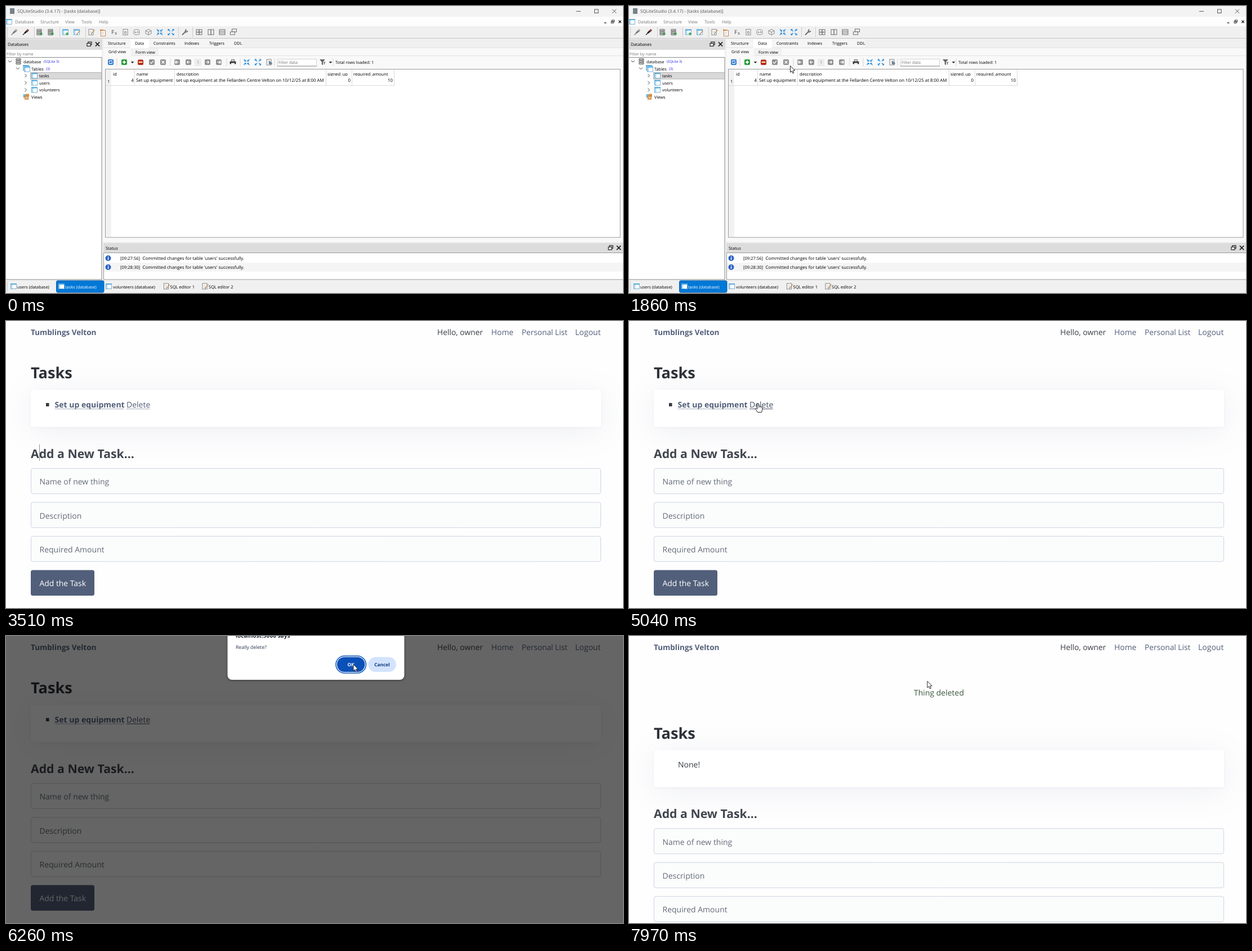
An HTML page with a canvas that plays this animation: 1096x511 px, repeating every 8000 ms.

```html
<!DOCTYPE html>
<html lang="en">
<head>
<meta charset="utf-8">
<title>Task list</title>
<style>
html, body { margin: 0; width: 100%; height: 100%; overflow: hidden; background: #fefefe; }
canvas { display: block; width: 1096px; height: 511px; }
</style>
</head>
<body>
<canvas id="stage" width="1096" height="511"></canvas>
<script>
const W = 1096, H = 511, LOOP = 8000;
const ctx = document.getElementById('stage').getContext('2d');
const FONT = '"Open Sans", "Noto Sans", sans-serif';

// ---------- helpers ----------
const clamp = v => Math.max(0, Math.min(1, v));
const span = (t, a, b) => clamp((t - a) / (b - a));
const easeOut = v => 1 - (1 - v) ** 3;
const easeInOut = v => v * v * (3 - 2 * v);

function rect(x, y, w, h, c) {
  ctx.fillStyle = c;
  ctx.fillRect(x, y, w, h);
}
function frame(x, y, w, h, c, lw = 1) {
  ctx.strokeStyle = c;
  ctx.lineWidth = lw;
  ctx.strokeRect(x, y, w, h);
}
function round(x, y, w, h, r, fill, stroke, lw = 1) {
  ctx.beginPath();
  ctx.roundRect(x, y, w, h, r);
  if (fill) { ctx.fillStyle = fill; ctx.fill(); }
  if (stroke) { ctx.strokeStyle = stroke; ctx.lineWidth = lw; ctx.stroke(); }
}
function trace(x, y, pts) {
  ctx.beginPath();
  for (let i = 0; i < pts.length; i += 2) ctx.lineTo(x + pts[i], y + pts[i + 1]);
}
function line(x, y, pts, c, lw = 1) {
  trace(x, y, pts);
  ctx.strokeStyle = c;
  ctx.lineWidth = lw;
  ctx.stroke();
}
function poly(x, y, pts, c) {
  trace(x, y, pts);
  ctx.fillStyle = c;
  ctx.fill();
}
function disc(x, y, r, c) {
  ctx.beginPath();
  ctx.arc(x, y, r, 0, 7);
  ctx.fillStyle = c;
  ctx.fill();
}
// y is the middle of the capital letters
function text(s, x, y, size = 7.5, c = '#000', weight = 400, align = 'left') {
  ctx.font = `${weight} ${size}px ${FONT}`;
  ctx.textAlign = align;
  ctx.fillStyle = c;
  ctx.fillText(s, x, y + size * 0.36);
}

// ---------- icons, all placed by their centre ----------
const BLUE = '#2b8fe0', GREY = '#6b6b6b', OFF = '#8f8f8f';

function cross(x, y, r, c, lw) {
  line(x, y, [-r, -r, r, r], c, lw);
  line(x, y, [-r, r, r, -r], c, lw);
}
function plus(x, y, r, c, lw) {
  line(x, y, [-r, 0, r, 0], c, lw);
  line(x, y, [0, -r, 0, r], c, lw);
}
function table(x, y) {
  rect(x - 5, y - 5, 11, 10, '#fff');
  rect(x - 5, y - 5, 3.5, 10, '#b5e0f6');
  rect(x - 5, y - 5, 11, 2.2, '#55b0e8');
  frame(x - 4.5, y - 4.5, 10, 9, '#6fa9cf', 0.9);
}
function stack(x, y) {
  for (const d of [-3.6, 0, 3.6]) {
    round(x - 4.5, y + d - 1.6, 9, 3.4, 1.4, '#9b9b9b', '#666', 0.6);
    rect(x - 3, y + d - 0.5, 5, 0.8, '#ddd');
  }
}
function page(x, y, c = '#777') {
  rect(x - 4, y - 5, 8, 10, '#fff');
  frame(x - 4, y - 5, 8, 10, c, 0.9);
  for (const d of [-2, 0, 2]) line(x, y + d, [-2.4, 0, 1.6, 0], '#bbb', 0.7);
}
function pencil(x, y) {
  line(x, y, [4, -4, -1, 2], '#c99a5c', 1.5);
  line(x, y, [-1, 2, -2, 3.4], '#444', 1.2);
}
function plug(x, y, c) {
  line(x, y, [-5, 5, -2, 2], c, 1.2);
  poly(x, y, [-3, 1, 1, -3, 3, -1, -1, 3], c);
  line(x, y, [1, -2, 4, -5], c, 1.1);
  line(x, y, [2, 0, 5.4, -3.4], c, 1.1);
}
function arrows(x, y, inward) {
  for (const [a, b] of [[-1, -1], [1, -1], [-1, 1], [1, 1]]) {
    line(x, y, [a * 1.5, b * 1.5, a * 5, b * 5], BLUE, 1.5);
    const k = inward ? 1 : 5.6, m = inward ? 4.6 : 2;
    poly(x, y, [a * k, b * k, a * m, b * k, a * k, b * m], BLUE);
  }
}
function key(x, y, c) { round(x - 5, y - 5, 10, 10, 2, c); }
function navKey(x, y, dir, bar) {
  key(x, y, OFF);
  line(x, y, [-3 * dir, 0, 2 * dir, 0], '#fff', 1.2);
  line(x, y, [0, -2.6, 2.6 * dir, 0, 0, 2.6], '#fff', 1.2);
  if (bar) line(x, y, [3.3 * dir, -3, 3.3 * dir, 3], '#fff', 1);
}
function handle(x, y, h) {
  for (let d = 0; d < h; d += 2) rect(x, y + d, 1, 1, '#aaa');
}
function chevron(x, y, open) {
  line(x, y, open ? [-3, -1.5, 0, 1.5, 3, -1.5] : [-1.5, -3, 1.5, 0, -1.5, 3], '#444', 1);
}
function dockButtons(x, y) {
  frame(x - 2, y - 4, 6, 5, '#222', 1.2);
  rect(x - 4, y - 1.5, 6, 5, '#eee');
  frame(x - 4, y - 1.5, 6, 5, '#222', 1.2);
  cross(x + 14.5, y, 3.6, '#222', 1.7);
}
function panes(x, y, draw) {
  frame(x - 5, y - 4.5, 10, 9, GREY);
  draw();
}

// ---------- database window ----------
function titleAndMenu() {
  rect(0, 0, W, 19, '#f3f3f3');
  rect(0, 19, W, 17, '#fdfdfd');
  rect(7, 4, 8, 10, '#77828a');
  text('SQLiteStudio (3.4.17) - [tasks (database)]', 20, 9.5, 7.9, '#555');
  line(1017, 9.5, [-4, 0, 4, 0], '#555');
  frame(1045.5, 6, 6.5, 6.5, '#555');
  cross(1080.5, 9.3, 3.5, '#555', 1);
  table(5, 28);
  [['Database', 16], ['Structure', 61], ['View', 105], ['Tools', 134], ['Help', 165]]
    .forEach(([s, x]) => text(s, x, 28, 7.7, '#777'));
  line(1064.5, 30, [-2, 0, 2, 0], '#222', 1.3);
  frame(1076.5, 25, 4, 3.5, '#333', 0.9);
  frame(1075, 27, 4, 3.5, '#333', 0.9);
  cross(1090.5, 28, 2.2, '#222', 1.3);
}

function mainToolbar() {
  const y = 46.5;
  rect(0, 36, W, 22, '#f0f0f0');
  [2, 50, 95, 141, 306, 331].forEach(x => handle(x, 38, 18));
  plug(14.5, y, '#777');
  plug(35, y, '#222');
  disc(39, 43, 1.5, '#c33');
  stack(59, y); plus(62.5, 49.5, 2.6, '#2fa043', 1.7);
  stack(79, y); plus(82.5, 49.5, 2.6, '#2fa043', 1.7);
  table(105, y); plus(108.5, 49.5, 2.6, '#2fa043', 1.7);
  table(125, y); pencil(127.5, 47.5);
  page(151, y); pencil(153.5, 46.5);
  poly(171.5, y, [-5, -5, 3, -4, 5, 0, -3, -1], '#e08a3c');
  page(172.5, y + 2, '#b9793d');
  text('F', 187, 46, 10, '#444');
  text('x', 193, 48.5, 8, '#444');
  page(212, y); text('{}', 212, y, 6, '#333', 400, 'center');
  round(227, 42, 10, 9, 3, '#fafafa', '#888'); text('a,b', 232, y, 5, '#333', 400, 'center');
  line(253, y, [0, -5, 5, -2.5, 5, 2.5, 0, 5, -5, 2.5, -5, -2.5, 0, -5], '#888');
  line(253, y, [-5, -2.5, 0, 0, 5, -2.5], '#888');
  line(253, y, [0, 0, 0, 5], '#888');
  arrows(273, y, true);
  arrows(293, y, false);
  line(318, y, [-5, 5, 1, -1], GREY, 2);
  line(318, y, [2, -5, 0.5, -2, 2, 0, 5, -2], GREY, 1.8);
  panes(343, y, () => plus(343, y, 4.5, GREY, 1.4));
  panes(364, y, () => line(364, y, [0, -4.5, 0, 4.5], GREY, 1.4));
  panes(384, y, () => { rect(379, 44.5, 10, 1, GREY); rect(379, 47.5, 10, 1, GREY); });
  frame(401.5, 41, 8, 5, GREY);
  rect(398.5, 46, 8, 5, '#f0f0f0');
  frame(398.5, 46, 8, 5, GREY);
  rect(0, 57, W, 1, '#c4c4c4');
}

function databaseTree() {
  rect(0, 59, 171, 19, '#dcdcdc');
  text('Databases', 3, 68.5, 7.6);
  dockButtons(148, 68);
  rect(0, 78, 170, 13, '#fff');
  text('Filter by name', 1, 85.5, 7.2, '#777');
  rect(0, 91, 170.5, 396, '#fff');
  frame(-0.5, 91.5, 170.5, 395.5, '#8a8a8a');
  chevron(7, 98.5, true);
  stack(22, 98.5);
  text('database', 31, 99, 7.3);
  text('(SQLite 3)', 67, 98.5, 6.2, '#2020e0');
  chevron(21, 111, true);
  table(35, 110); table(37, 112.5);
  text('Tables', 45, 112, 7.4);
  text('(3)', 71, 111.5, 6.2, '#2020e0');
  rect(43, 118, 126.5, 12, '#d9d9d9');
  frame(43.5, 118.5, 126, 11.5, '#b0b0b0');
  ['tasks', 'users', 'volunteers'].forEach((s, i) => {
    const y = 124 + i * 12.7;
    chevron(35, y, false);
    table(50, y);
    text(s, 59, y + 0.3, 7.4);
  });
  rect(30.5, 157, 6, 6, '#6fb9e6');
  rect(35, 156.5, 6, 5, '#e0913a');
  rect(33, 160, 7, 6.5, '#f0b873');
  frame(33.5, 160.5, 6, 5.5, '#b9783a', 0.9);
  text('Views', 45, 162.3, 7.4);
}

function gridToolbar() {
  const y = 100;
  key(186, y, '#2f78d0');
  line(186, y, [-3, 0, -2, -2.4, 2, -2.4, 2.6, -1], '#fff', 1.2);
  line(186, y, [3, 0, 2, 2.4, -2, 2.4, -2.6, 1], '#fff', 1.2);
  key(210, y, '#279a3a'); plus(210, y, 3, '#fff', 1.8);
  poly(224.5, y, [-2.8, -1, 2.8, -1, 0, 2], '#222');
  round(234, 95.5, 10, 9.5, 2, '#b52a1c'); rect(235.5, 98.8, 7, 2.3, '#ffe3a8');
  key(259, y, OFF); line(259, y, [-2.8, 0, -0.8, 2.3, 3, -2.6], '#fff', 1.3);
  key(279, y, OFF); cross(279, y, 2.4, '#fff', 1.4);
  navKey(304, y, -1, true);
  navKey(324, y, -1);
  rect(335, 94, 12, 13, '#ececec');
  text('1', 341, 100.5, 7.4, '#888', 400, 'center');
  navKey(358, y, 1);
  navKey(378, y, 1, true);
  rect(400, 95, 6, 4, '#ddd'); frame(400.5, 95.5, 5, 4, '#555', 0.8);
  round(397.5, 98.5, 11, 5, 1, '#3c3c3c');
  rect(400, 101.5, 6, 3.5, '#f4f4f4');
  arrows(427.5, y, true);
  arrows(447.5, y, false);
  page(467, y); poly(468, y, [-1, -3, 4.5, 1, 4.5, 4, -1, 4], '#6f8592');
  [196.5, 291.5, 391.5, 415.5, 476.5, 580.5].forEach(x => rect(x, 93, 1, 14, '#d6d6d6'));
  rect(482, 94, 70, 13, '#fff');
  frame(482.5, 94.5, 69, 12.5, '#d4d4d4');
  rect(482, 106.5, 70, 1, '#999');
  text('Filter data', 484, 100.5, 7.3, '#777');
  poly(562, y, [-5, -5, 5, -5, 1.2, -0.5, 1.2, 5, -1.2, 4, -1.2, -0.5], '#666');
  text('T', 564, 102, 6, '#333', 700);
  poly(576.5, y, [-2.8, -1, 2.8, -1, 0, 2], '#222');
  text('Total rows loaded: 1', 585, 100.5, 7.35);
}

function dataPane() {
  rect(171, 58, W - 171, 16, '#f0f0f0');
  rect(173, 74, W - 173, 346, '#f9f9f9');
  rect(174, 59, 246, 15, '#f5f5f5');
  rect(221, 59, 33, 16, '#fff');
  [['Structure', 181], ['Data', 229], ['Constraints', 262], ['Indexes', 317], ['Triggers', 361], ['DDL', 405]]
    .forEach(([s, x]) => text(s, x, 66.5, 7.3));
  rect(173, 74, 48, 1, '#e2e2e2');
  rect(254, 74, W - 254, 1, '#e2e2e2');
  rect(222, 75, 49, 13, '#f1f1f1');
  rect(222, 88, W - 222, 1, '#e4e4e4');
  text('Grid view', 182, 81.5, 7.2);
  text('Form view', 230, 82, 7.3);
  gridToolbar();

  rect(176, 112, 915, 300, '#fff');
  frame(176.5, 112.5, 914.5, 299.5, '#9a9a9a');
  rect(177, 113, 10, 298, '#f2f2f2');
  [['id', 190], ['name', 232], ['description', 303], ['signed_up', 571], ['required_amount', 617]]
    .forEach(([s, x]) => text(s, x, 121, 7.6));
  // the low header row cuts off the underscores
  rect(187, 124.5, 503, 16.5, '#fff');
  [228, 299, 568, 614, 689].forEach(x => rect(x, 113, 1, 29, '#dadada'));
  rect(177, 141, 512, 1, '#dadada');
  text('1', 182, 134.5, 7.4, '#000', 400, 'center');
  text('4', 227, 132.5, 7.9, '#000', 400, 'right');
  text('Set up equipment', 231, 132.5, 7.9);
  text('set up equipment at the Fellarden Centre Velton on 10/12/25 at 8:00 AM', 302, 132.5, 7.85);
  text('0', 612, 132.5, 7.9, '#000', 400, 'right');
  text('10', 687, 132.5, 7.9, '#000', 400, 'right');
}

function statusPane() {
  rect(173, 422, W - 173, 18, '#dcdcdc');
  text('Status', 177, 431, 7.5);
  dockButtons(1074, 430.5);
  rect(173, 440, W - 173, 47, '#fff');
  rect(173, 457, W - 173, 16, '#f5f5f5');
  line(173.5, 439.5, [W, 0, 0, 0, 0, 47.5, W, 47.5], '#9a9a9a');
  ['[09:27:56]', '[09:28:30]'].forEach((s, i) => {
    const y = 449 + i * 16;
    disc(181.5, y, 5, '#2c62c4');
    rect(180.8, y - 1, 1.6, 4, '#fff');
    rect(180.8, y - 3.3, 1.6, 1.5, '#fff');
    text(s, 203, y + 0.5, 7.6);
    text("Committed changes for table 'users' successfully.", 242.5, y + 0.5, 7.95);
  });
}

function windowTabs() {
  rect(0, 488, W, 23, '#f0f0f0');
  handle(2, 491, 18);
  round(89.5, 489, 84.5, 21, 2.5, '#0078d7', '#0a5ea8');
  table(13, 499); text('users (database)', 20, 500, 7.4);
  table(98, 499); text('tasks (database)', 105, 500, 7.4, '#fff');
  table(182, 499); text('volunteers (database)', 190, 500, 7.45);
  page(284.5, 499); pencil(287, 499.5); text('SQL editor 1', 291.5, 500, 7.6);
  page(353, 499); pencil(355.5, 499.5); text('SQL editor 2', 360, 500, 7.6);
}

function drawDatabase() {
  rect(0, 0, W, H, '#f0f0f0');
  titleAndMenu();
  mainToolbar();
  dataPane();
  databaseTree();
  statusPane();
  windowTabs();
}

// ---------- web page ----------
const LINK = '#525f7a', BODY = '#373c44';

function drawPage(deleted, hover, caret) {
  const dy = deleted ? 80.4 : 0;
  rect(0, 0, W, H, '#fefefe');
  text('Tumblings Velton', 44, 20, 13.5, LINK, 700);
  text('Hello, owner', 766, 20, 13.85, BODY);
  text('Home', 862, 20, 13.9, LINK);
  text('Personal List', 916, 20, 13.7, LINK);
  text('Logout', 1011, 20, 14, LINK);
  if (deleted) text('Thing deleted', 550.5, 101, 14, '#3d5a40', 400, 'center');

  ctx.save();
  ctx.translate(0, dy);
  text('Tasks', 44, 92.5, 27.2, '#2d3138', 700);
  ctx.save();
  ctx.shadowColor = 'rgba(110,120,165,0.11)';
  ctx.shadowBlur = 56;
  ctx.shadowOffsetY = 8;
  round(44, 122.5, 1013, 66, 3.5, '#fff');
  ctx.shadowColor = 'rgba(110,120,165,0.07)';
  ctx.shadowBlur = 5;
  ctx.shadowOffsetY = 1;
  round(44, 122.5, 1013, 66, 3.5, '#fff');
  ctx.restore();
  if (deleted) {
    text('None!', 87, 149, 14, BODY);
  } else {
    rect(71, 146, 5.5, 6, BODY);
    text('Set up equipment', 86.5, 149, 14, LINK, 700);
    rect(86.5, 156, 123.5, 1, '#a4acbd');
    text('Delete', 214, 149, 14, hover ? '#454f66' : LINK);
    rect(214, 156, 41.5, 1, hover ? '#454f66' : '#a4acbd');
  }
  text('Add a New Task...', 44, 236, 21.25, '#40454e', 700);
  if (caret) rect(59, 219.5, 1, 29.5, '#8c8f98');
  ['Name of new thing', 'Description', 'Required Amount'].forEach((s, i) => {
    const y = 262.5 + i * 60.4;
    round(44.5, y, 1012, 45, 3.5, '#fbfdfc', '#cfd3e4');
    text(s, 59.5, y + 23.7, 14, '#646b79');
  });
  round(44, 443.5, 113, 45.5, 3.5, LINK);
  text('Add the Task', 59.5, 467, 13.9, '#fff');
  ctx.restore();
}

function drawDialog(dy, alpha, focus) {
  if (alpha <= 0) return;
  ctx.save();
  ctx.globalAlpha = alpha;
  ctx.translate(0, dy);
  ctx.save();
  ctx.shadowColor = 'rgba(0,0,0,0.45)';
  ctx.shadowBlur = 4;
  ctx.shadowOffsetY = 1;
  round(393.5, -60, 314, 138, 8, '#fff');
  ctx.restore();
  text('localhost:5000 says', 408, -1, 10.1, '#1f2937', 700);
  text('Really delete?', 408, 19.5, 8.7, '#26344d');
  round(588, 37.5, 49.5, 26.5, 13.2, '#0b50b8');
  if (focus) round(586, 35.5, 53.5, 30.5, 15.2, null, '#0b50b8', 1.5);
  text('OK', 612.7, 50.8, 8.4, '#fff', 700, 'center');
  round(643.5, 37.5, 49.5, 26.5, 13.2, '#d3e3fd');
  text('Cancel', 668, 50.8, 8.3, '#0d3a80', 700, 'center');
  ctx.restore();
}

// ---------- pointer ----------
function drawArrow(x, y) {
  const p = [0, 0, 0, 11.6, 2.7, 9.3, 4.5, 13.4, 6.4, 12.5, 4.7, 8.6, 8.3, 8.3];
  poly(x + 0.5, y + 0.5, p, '#fff');
  ctx.closePath();
  ctx.strokeStyle = '#222';
  ctx.lineWidth = 1;
  ctx.stroke();
}
function drawHand(x, y) {
  poly(x, y, [-1.2, 0.8, 0, 0, 1.3, 0.8, 1.3, 5, 4, 5.3, 6.5, 6.2, 7.8, 7.4, 7.8, 11.5,
    6.3, 16, -0.5, 16, -4.4, 10.3, -4, 9, -2.6, 9.1, -1.2, 10.5], '#fff');
  ctx.closePath();
  ctx.lineJoin = 'round';
  ctx.strokeStyle = '#222';
  ctx.lineWidth = 1;
  ctx.stroke();
  for (const d of [1.4, 3.6, 5.8]) line(x + d, y, [0, 5.5, 0, 8.5], '#555', 0.7);
}
function drawBeam(x, y) {
  line(x, y, [-2.5, -6.5, 2.5, -6.5], '#333');
  line(x, y, [0, -6.5, 0, 6.5], '#333');
  line(x, y, [-2.5, 6.5, 2.5, 6.5], '#333');
}

// Catmull-Rom curve through a few points, v in 0..1
function along(pts, v) {
  const n = pts.length - 1, s = v * n, i = Math.min(n - 1, Math.floor(s)), u = s - i;
  const at = k => pts[Math.max(0, Math.min(n, k))];
  const [a, b, c, d] = [at(i - 1), at(i), at(i + 1), at(i + 2)];
  return [0, 1].map(k => 0.5 * (2 * b[k] + (c[k] - a[k]) * u
    + (2 * a[k] - 5 * b[k] + 4 * c[k] - d[k]) * u * u
    + (3 * b[k] - a[k] - 3 * c[k] + d[k]) * u ** 3));
}

// [move start, move end, hidden at, points]
const moves = [
  [330, 1110, 1140, [[1029, 498], [700, 350], [300, 170], [70, 90], [14, 120]]],
  [1140, 1860, 1960, [[14, 120], [60, 154], [190, 128], [304, 88], [286, 106]]],
  [1960, 2740, 2740, [[286, 106], [210, 130], [260, 260], [450, 410], [608, 512]]],
  [4050, 4800, 5510, [[424, 505], [370, 370], [290, 220], [236, 150], [229, 146.5]]],
  [5510, 6260, 7630, [[229, 146.5], [400, 110], [560, 62], [627, 42], [616.5, 50]]],
  [7630, 7960, 8000, [[616.5, 50], [570, 62], [529.5, 80]]]
];

function pointerAt(t) {
  const m = moves.find(([from, , until]) => t >= from && t < until);
  return m && along(m[3], easeInOut(span(t, m[0], m[1])));
}
const onDelete = ([x, y]) => x > 213 && x < 256 && y > 140 && y < 160;
const onField = ([, y]) => y > 262 && y < 429 && (y - 262) % 60.4 < 46;

function drawPointer(t) {
  const p = pointerAt(t);
  if (!p) return;
  const live = t >= 4050 && t < 5510;
  if (live && onDelete(p)) drawHand(...p);
  else if (live && onField(p)) drawBeam(...p);
  else drawArrow(...p);
}

// ---------- timeline ----------
function draw(t) {
  if (t < 3510) {
    drawDatabase();
  } else {
    const hover = t >= 5000 || (t >= 4050 && onDelete(pointerAt(t)));
    drawPage(t >= 7630, hover, t < 4050);
    const dim = 0.6 * span(t, 5050, 5210) * (1 - span(t, 6830, 7000));
    if (dim > 0) rect(0, 0, W, H, `rgba(0,0,0,${dim})`);
    if (t >= 5050 && t < 7170) {
      const enter = easeOut(span(t, 5050, 5320)), leave = span(t, 7020, 7170);
      drawDialog(-20 * (1 - enter) - 28 * leave * leave, span(t, 5050, 5170) * (1 - leave), t < 6830);
    }
  }
  drawPointer(t);
}

const start = performance.now();
function tick() {
  ctx.textRendering = 'geometricPrecision';
  ctx.lineJoin = 'miter';
  draw((performance.now() - start) % LOOP);
  requestAnimationFrame(tick);
}
tick();
</script>
</body>
</html>
```
